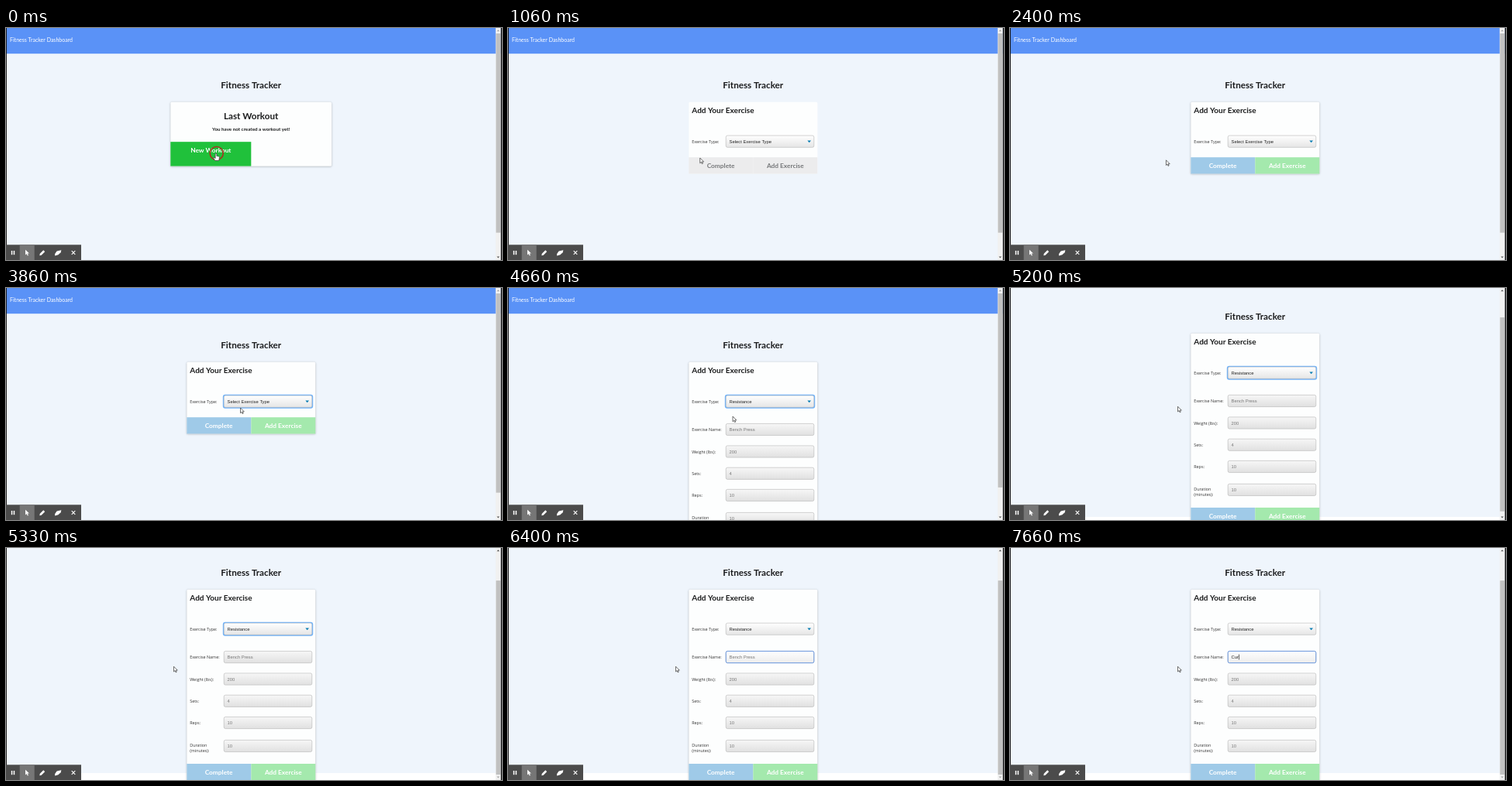
An HTML page with a canvas for the animation above (8 s loop, 640 by 300 pixels).

```html
<!DOCTYPE html>
<html lang="en">
<head>
<meta charset="utf-8">
<title>Fitness Tracker</title>
<style>
html, body { margin: 0; width: 100%; height: 100%; overflow: hidden; }
canvas { display: block; }
</style>
</head>
<body>
<canvas id="stage" width="640" height="300"></canvas>
<script>
const ctx = document.getElementById('stage').getContext('2d');
const LOOP = 8000;
const LATO = 'Lato, sans-serif';
const LABEL = '5.42px "Open Sans", sans-serif';
const FIELD = '5.83px "Liberation Sans", Arial, sans-serif';
const INK = '#1b1c1d';

// Pointer path: time, x, y
const POINTER = [
  [0, 271, 162.5], [980, 271, 162.5], [1060, 248, 168], [1530, 187.5, 174],
  [2370, 187.5, 174], [2860, 301, 148], [3780, 301, 148], [3860, 302.5, 155],
  [4560, 302.5, 155], [4660, 290, 166], [4780, 290, 166], [4870, 217, 153.7],
  [5300, 216.5, 153.2], [LOOP, 216.5, 153.2],
];
const FIELDS = [
  ['Exercise Name:', 'Bench Press', 183], ['Weight (lbs):', '200', 211.5],
  ['Sets:', '4', 239.8], ['Reps:', '10', 268], ['Duration', '10', 298],
];
const ARROW = new Path2D('M0 0V6.7L1.6 5.3 2.6 7.6 3.7 7.1 2.7 4.9H4.8Z');
const HAND = new Path2D('M-.9 0Q0 -.9 .9 0V3L3.6 3.6Q4.6 3.9 4.4 5.2L3.7 9H-1.2L-3.2 6Q-3.5 4.6 -2.2 5L-.9 6Z');

const clamp = v => Math.max(0, Math.min(1, v));
const progress = (t, from, length) => clamp((t - from) / length);
const easeInOut = p => p < 0.5 ? 4 * p ** 3 : 1 - 4 * (1 - p) ** 3;

function rect(x, y, w, h, fill) {
  ctx.fillStyle = fill;
  ctx.fillRect(x, y, w, h);
}

function text(str, x, y, font, fill = INK, align = 'left') {
  ctx.font = font;
  ctx.fillStyle = fill;
  ctx.textAlign = align;
  ctx.fillText(str, x, y);
}

function poly(points, fill) {
  ctx.fillStyle = fill;
  ctx.fill(new Path2D('M' + points + 'Z'));
}

function box(x, y, w, h, r) {
  ctx.beginPath();
  ctx.roundRect(x, y, w, h, r);
}

function card(x, y, w, h, shadow = 1) {
  ctx.save();
  ctx.shadowColor = `rgba(34,36,38,${0.35 * shadow})`;
  ctx.shadowBlur = 2.5;
  ctx.shadowOffsetY = 0.5;
  ctx.fillStyle = '#fdfefe';
  box(x, y, w, h, 1.6);
  ctx.fill();
  ctx.restore();
}

function field(cy, top, bottom, ring) {
  const y = cy - 7.8;
  if (ring) {
    ctx.fillStyle = 'rgba(59,153,252,.75)';
    box(279.8, y - 1.2, 116.4, 18, 3);
    ctx.fill();
  }
  const shade = ctx.createLinearGradient(0, y, 0, y + 15.6);
  shade.addColorStop(0, top);
  shade.addColorStop(1, bottom);
  ctx.fillStyle = shade;
  box(281.2, y + 0.2, 113.6, 15.2, 2);
  ctx.fill();
  ctx.strokeStyle = '#b4b4b4';
  ctx.lineWidth = 0.6;
  ctx.stroke();
}

function buttons(y, alpha, left, right, ink) {
  ctx.save();
  ctx.globalAlpha = alpha;
  rect(233.3, y, 83, 21.3, left);
  rect(316.3, y, 83, 21.3, right);
  text('Complete', 274.6, y + 14, `bold 8.33px ${LATO}`, ink, 'center');
  text('Add Exercise', 357.8, y + 14, `bold 8.33px ${LATO}`, ink, 'center');
  ctx.restore();
}

function welcome() {
  card(212.3, 95.8, 207.8, 83);
  text('Last Workout', 316.2, 117.9, `bold 11.67px ${LATO}`, INK, 'center');
  text('You have not created a workout yet!', 316.2, 132.8, `bold 6.25px ${LATO}`, INK, 'center');
  rect(212.3, 147.2, 104, 31.4, '#20c13b');
  text('New Workout', 264.3, 161, `bold 8.33px ${LATO}`, '#fff', 'center');
}

function nameInput(t) {
  const typed = 'Cur'.slice(0, t < 7330 ? 0 : t < 7500 ? 1 : t < 7640 ? 2 : 3);
  field(183, '#ffffff', '#ececec');
  ctx.strokeStyle = '#6e9be2';
  ctx.lineWidth = 1;
  ctx.stroke();
  text(typed || 'Bench Press', 285.6, 185.2, FIELD, typed ? '#222' : '#777');
  if (typed || t < 6400 || t >= 6930) {
    const caret = 285.6 + (typed ? ctx.measureText(typed).width : 0);
    rect(caret, 179.6, 0.7, 6.8, '#222');
  }
}

function form(t) {
  const expanded = t >= 4330;
  const bottom = expanded ? 321 : 167.2;
  const ready = progress(t, 1070, 100);
  card(233.3, 95.8, 166, bottom + 21.3 - 95.8, ready);
  text('Add Your Exercise', 237.3, 109.8, `bold 10px ${LATO}`);
  text('Exercise Type:', 237.2, 149.2, LABEL, '#333');
  field(146.7, '#ffffff', '#e5e5e5', t >= 3200 && t < 5860);
  text(expanded ? 'Resistance' : 'Select Exercise Type', 285.6, 148.8, FIELD, '#222');
  poly('386.4 145.5H391L388.7 148.3', '#007cb2');

  if (expanded) {
    FIELDS.forEach(([label, hint, y], i) => {
      text(label, 237.2, y + (i === 4 ? 0.6 : 2.4), LABEL, '#333');
      if (i === 0 && t >= 5860) return nameInput(t);
      field(y, '#f7f7f7', '#e0e0e0');
      text(hint, 285.6, y + 2.2, FIELD, '#777');
    });
    text('(minutes):', 237.2, 306.4, LABEL, '#333');
  }
  if (ready < 1) buttons(bottom, 1, '#ececed', '#ececed', '#76787a');
  buttons(bottom, ready, '#9fcae8', '#a4e9ad', '#fff');
}

function scrollbar(scroll, height) {
  rect(631.8, 0, 7, 300, '#f1f1f1');
  rect(632.3, 7 + 286 * scroll / height, 5.8, 286 * 300 / height, '#c1c1c1');
  poly('633.4 4.2H636.8L635.1 2.2', scroll ? '#505050' : '#a3a3a3');
  poly('633.4 295.5H636.8L635.1 297.5', scroll > 41 ? '#a3a3a3' : '#505050');
  rect(638.6, 0, 1.4, 300, '#111');
  rect(0, 0, 0.9, 300, '#111');
}

function toolbar() {
  rect(0, 280.3, 97, 19.7, '#4b4b4b');
  rect(17.7, 280.3, 19, 19.7, '#767676');
  rect(6.8, 288, 1.5, 5.2, '#fff');
  rect(9.7, 288, 1.5, 5.2, '#fff');
  poly('25 286.8V293.4L26.6 292 27.8 294.4 28.9 293.9 27.8 291.6H30', '#fff');
  poly('43.3 294.2L43.8 291.8 48.3 287.3 50.2 289.2 45.7 293.7', '#fff');
  poly('63 292.2L65.6 288.6 71.4 287.2 70.6 290.2 67.4 293.2 63.2 294.4', '#fff');
  ctx.strokeStyle = '#fff';
  ctx.lineWidth = 1.1;
  ctx.stroke(new Path2D('M84.7 288.2L89.3 292.8M89.3 288.2L84.7 292.8'));
}

function clickRing(x, y, age) {
  if (age < 0 || age > 320) return;
  ctx.globalAlpha = 1 - progress(age, 120, 200);
  ctx.strokeStyle = '#a8301f';
  ctx.lineWidth = 1.6;
  ctx.beginPath();
  ctx.arc(x, y, 14 * clamp(age / 100), 0, 7);
  ctx.stroke();
  ctx.globalAlpha = 1;
}

function pointer(t) {
  const i = POINTER.findIndex(key => key[0] > t);
  const [t0, x0, y0] = POINTER[i - 1], [t1, x1, y1] = POINTER[i];
  const p = 1 - (1 - (t - t0) / (t1 - t0)) ** 2;
  const shape = t < 1000 ? HAND : ARROW;
  ctx.save();
  ctx.translate(x0 + (x1 - x0) * p, y0 + (y1 - y0) * p);
  ctx.fillStyle = '#fff';
  ctx.strokeStyle = '#333';
  ctx.lineWidth = 0.7;
  ctx.lineJoin = 'round';
  ctx.fill(shape);
  ctx.stroke(shape);
  ctx.restore();
}

function draw(t) {
  const scroll = 42 * easeInOut(progress(t, 4980, 320));
  rect(0, 0, 640, 300, '#fff');
  ctx.save();
  ctx.translate(0, -scroll);
  rect(0, 0, 640, 333, '#eff5fc');
  rect(0, 0, 640, 33.2, '#5a92f7');
  text('Fitness Tracker Dashboard', 5, 17.7, `7px ${LATO}`, '#fff');
  text('Fitness Tracker', 316.2, 78.2, `bold 11.67px ${LATO}`, INK, 'center');
  if (t < 1000) welcome(); else form(t);
  ctx.restore();
  scrollbar(scroll, t < 4330 ? 333 : 342);
  toolbar();
  clickRing(271.7, 162, t + 60);
  clickRing(301, 148, t - 3180);
  pointer(t);
}

const start = performance.now();
function tick() {
  draw((performance.now() - start) % LOOP);
  requestAnimationFrame(tick);
}
tick();
</script>
</body>
</html>
```
